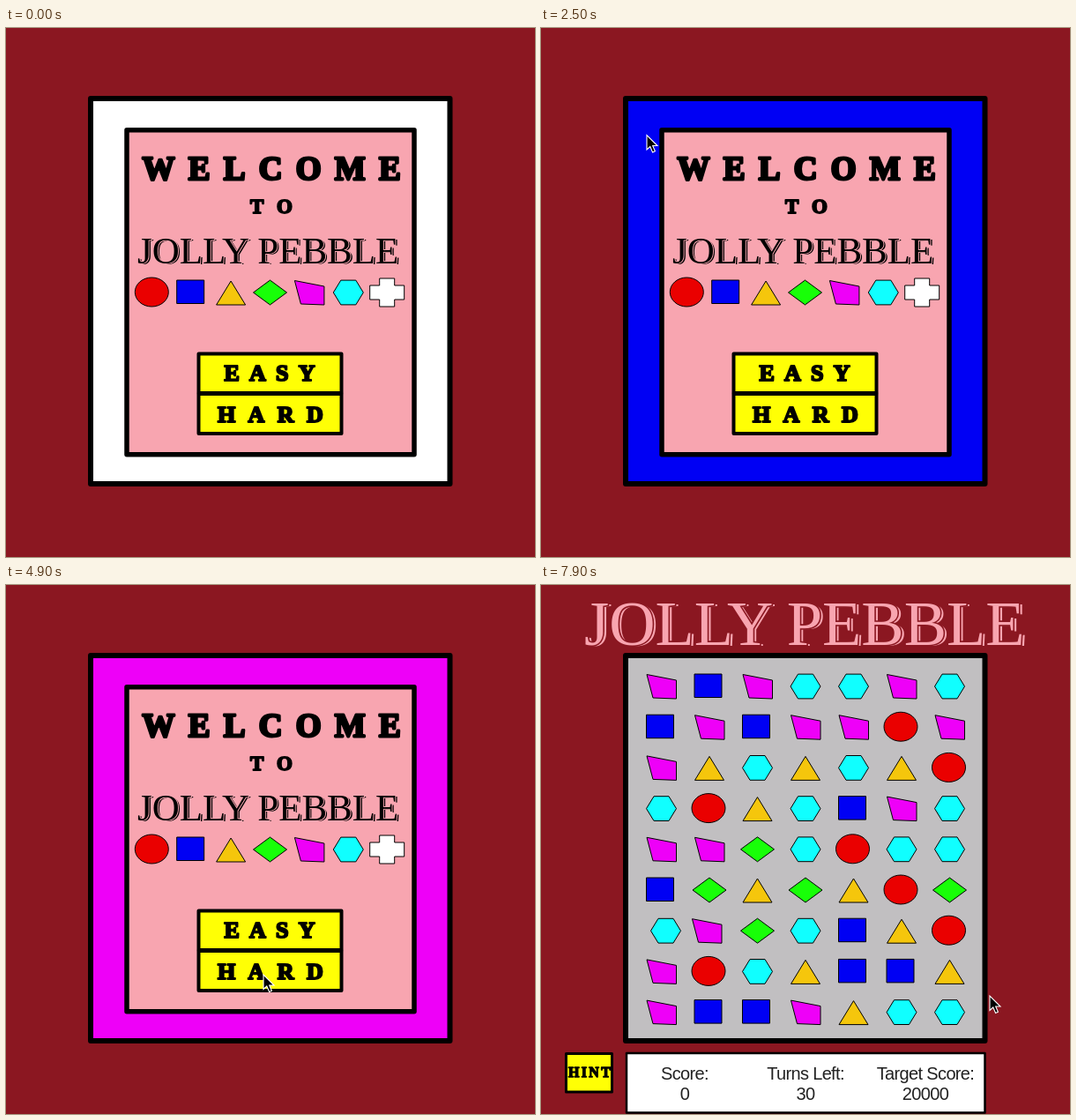
An HTML page for the animation above (8000 ms loop, 600 by 600 pixels).

```html
<!DOCTYPE html>
<html lang="en">
<head>
<meta charset="utf-8">
<title>Jolly Pebble</title>
<style>
  html, body { margin: 0; width: 100%; height: 100%; overflow: hidden; background: #8b1721; }
  svg { display: block; width: 100%; height: 100%; }
  .fat { font-family: "Liberation Serif", "Times New Roman", serif; font-weight: bold; stroke: #000; stroke-linejoin: round; }
  .title { font-family: "Liberation Serif", "Times New Roman", serif; paint-order: stroke; }
  .info { font: 20px "Liberation Sans", Arial, sans-serif; letter-spacing: -.65px; text-anchor: middle; fill: #222; }
  .box { stroke: #000; stroke-linejoin: round; }
</style>
</head>
<body>
<svg id="stage" viewBox="0 0 600 600"></svg>
<script>
const LOOP = 8000, STEP = 100, GAME_START = 6500;
const FIRST_COLOR = 300, COLOR_TIME = 1130;
const PINK = '#f8a5b0', WINE = '#8b1721', YELLOW = '#ffff05';
const NAME = 'JOLLY PEBBLE';

// Regular polygon with one corner at the given angle, squeezed to rx by ry
function ngon(n, rx, ry, angle, dy = 0) {
  const corners = Array.from({ length: n }, (_, i) => {
    const a = angle + i * 2 * Math.PI / n;
    return [rx * Math.cos(a), ry * Math.sin(a) + dy].map(v => v.toFixed(1));
  });
  return `<polygon points="${corners.join(' ')}"/>`;
}

// Circle, Square, Triangle, Diamond, Quad, Hexagon, Plus
const pieces = {
  C: ['#ea0000', '<ellipse cx="-1" cy="-.5" rx="19" ry="16.5"/>'],
  S: ['#0000f4', '<path d="M-17-14h31v26.5h-31z"/>'],
  T: ['#f5c60c', ngon(3, 19, 18, -Math.PI / 2, 5)],
  D: ['#18ff08', ngon(4, 19, 14, 0)],
  Q: ['#ee00f8', '<path d="M-16.5-13.5L17-7V14L-9.5 13z"/>'],
  H: ['#10ffff', ngon(6, 17, 16, 0)],
  P: ['#ffffff', '<path d="M-9-16h17v8h11v16h-11v8h-17v-8h-11v-16h11z"/>']
};
const kinds = Object.keys(pieces);
const board = 'QSQHHQH SQSQQCQ QTHTHTC HCTHSQH QQDHCHH SDTDTCD HQDHSTC QCHTSST QSSQTHH'.split(' ');

const cellX = col => 136.5 + 54.5 * col;
const cellY = row => 115 + 46.2 * row;

function piece(kind, x, y, id = '') {
  const [color, shape] = pieces[kind];
  return `<g id="${id}" transform="translate(${x} ${y})" fill="${color}" stroke="#000">${shape}</g>`;
}

const box = (x, y, w, h, fill, line, id = '') =>
  `<rect class="box" id="${id}" x="${x}" y="${y}" width="${w}" height="${h}" fill="${fill}" stroke-width="${line}"/>`;

const fat = (text, x, y, size, gap) =>
  `<text class="fat" x="${x}" y="${y}" font-size="${size}" letter-spacing="${gap}" stroke-width="${size * .08}">${text}</text>`;

const title = (x, y, size, ink, ground) =>
  `<g class="title" font-size="${size}" fill="${ink}">` +
  `<text x="${x + size * .05}" y="${y + size * .015}">${NAME}</text>` +
  `<text x="${x}" y="${y}" stroke="${ground}" stroke-width="${size * .045}">${NAME}</text></g>`;

const info = (label, value, x) =>
  `<text class="info" x="${x}" y="561">${label}</text><text class="info" x="${x}" y="584">${value}</text>`;

const panel = fill => box(96, 80, 407.5, 437, fill, 6, 'panel');

const menu =
  panel('#fff').replace('panel', 'border') +
  box(137, 115.7, 326, 368, PINK, 5.5) +
  fat('WELCOME', 154.5, 171.5, 37, 15.3) +
  fat('TO', 277, 209.5, 23, 15) +
  title(149, 267, 43, '#000', PINK) +
  kinds.map((kind, i) => piece(kind, 166.3 + 44.4 * i, 300)).join('') +
  box(218.5, 369.5, 162, 44.5, YELLOW, 4) +
  box(218.5, 415, 162, 45, YELLOW, 4) +
  fat('EASY', 247.5, 399.5, 26, 11.2) +
  fat('HARD', 240, 446.5, 26, 14.4);

const game =
  title(49, 68, 72.5, PINK, WINE) +
  panel('#c1bfc1') +
  board.map((row, r) => [...row].map((kind, c) =>
    piece(kind, cellX(c), cellY(r), `cell${r}${c}`)).join('')).join('') +
  box(28.5, 531.5, 52, 43.5, YELLOW, 3) +
  fat('HINT', 31, 558, 16, 2.3) +
  box(97, 531, 406.5, 67.5, '#fff', 2.5) +
  info('Score:', 0, 163) + info('Turns Left:', 30, 300) + info('Target Score:', 20000, 436);

const $ = id => document.getElementById(id);
$('stage').innerHTML =
  `<rect width="600" height="600" fill="${WINE}"/><g id="menu">${menu}</g><g id="game">${game}</g>` +
  '<path id="cursor" d="M0 0V16.5L3.8 13L6.6 19.5L9.4 18.3L6.7 12H12Z" stroke="#fff" stroke-width="1.1"/>';

// Pointer stops: enters top left, rests on HARD, then leaves the board
const stops = [
  { t: 1900, x: 57, y: 12 }, { t: 2000, x: 92, y: 20 }, { t: 2500, x: 120, y: 121.5 },
  { t: 3500, x: 292, y: 442 }, { t: 6400, x: 292, y: 442 },
  { t: 6500, x: 287, y: 394.5 }, { t: 7900, x: 509, y: 466 }
];

function pointer(t) {
  const i = Math.max(1, stops.findIndex(s => s.t >= t));
  const a = stops[i - 1], b = stops[i];
  const k = (t - a.t) / (b.t - a.t), ease = k * k * (3 - 2 * k);
  return [a.x + (b.x - a.x) * ease, a.y + (b.y - a.y) * ease];
}

const place = (id, x, y) => $(id).setAttribute('transform', `translate(${x} ${y})`);
const show = (id, on) => $(id).setAttribute('visibility', on ? 'visible' : 'hidden');

function draw(now) {
  const t = Math.floor(now % LOOP / STEP) * STEP;
  const playing = t >= GAME_START;
  show('menu', !playing);
  show('game', playing);

  // The border runs through the piece colours until the click on HARD
  const turn = Math.min(4, Math.floor((t - FIRST_COLOR) / COLOR_TIME));
  $('border').setAttribute('fill', turn < 0 ? '#fff' : pieces[kinds[turn]][0]);

  // Two neighbours start to trade places
  const slide = Math.max(0, (t - 7700) / 40);
  place('cell60', cellX(0) + slide, cellY(6));
  place('cell61', cellX(1) - slide * .6, cellY(6));

  show('cursor', t >= stops[0].t);
  place('cursor', ...pointer(t));
  requestAnimationFrame(draw);
}
draw(performance.now());
</script>
</body>
</html>
```
